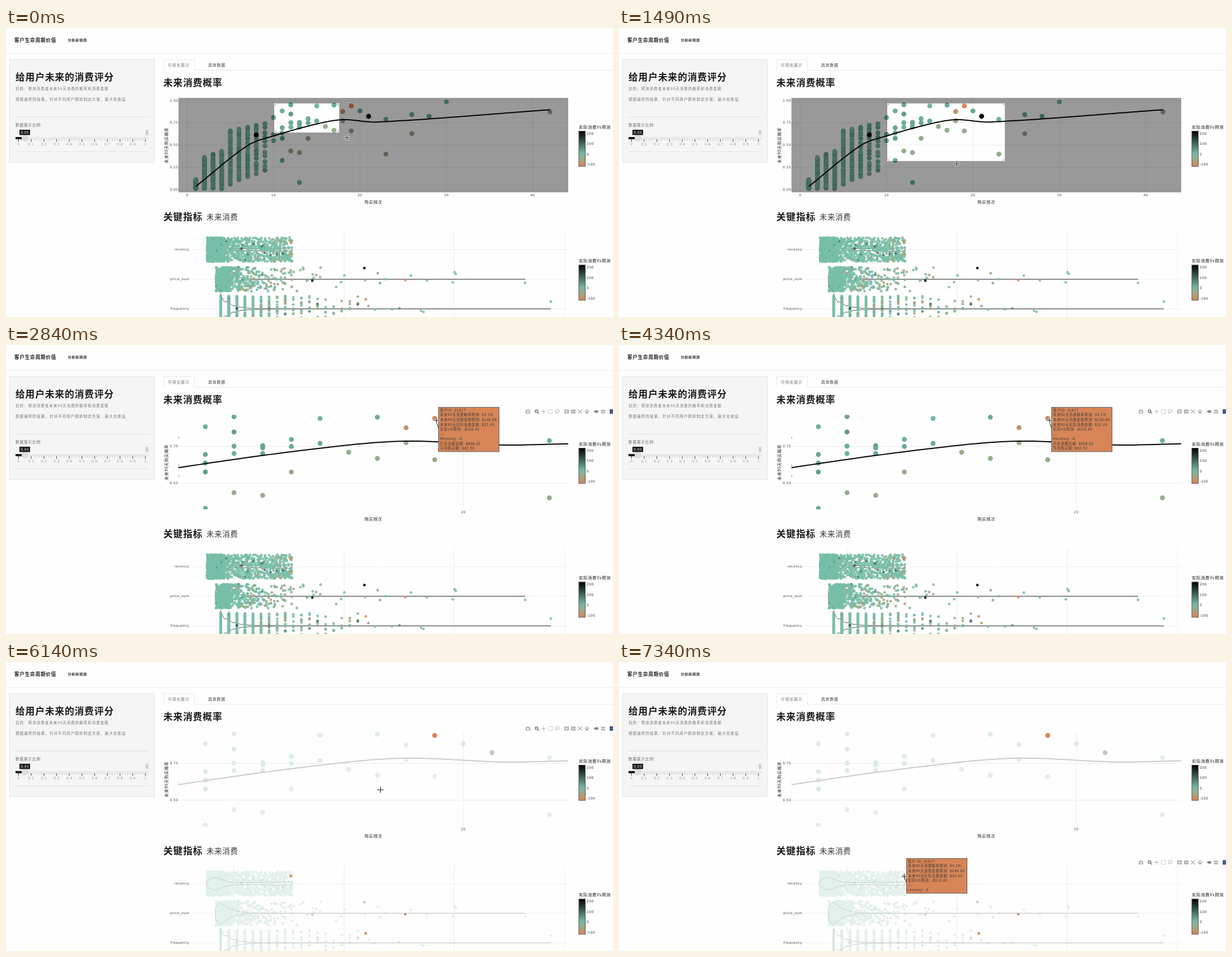
Recreate the animation shown at these times as an HTML page with a canvas. Size 1084x517 px, loop 8 s.

```html
<!DOCTYPE html>
<html lang="zh">
<head>
<meta charset="utf-8">
<style>
html, body { margin: 0; width: 100%; height: 100%; overflow: hidden; background: #fefefe; }
canvas { display: block; }
</style>
</head>
<body>
<canvas id="stage" width="1084" height="517"></canvas>
<script>
const W = 1084, H = 517, LOOP = 8000, STEP = 150;
const CJK = '"Noto Sans CJK SC", "Noto Sans CJK", "Noto Sans", sans-serif';
const AXIS = '"DejaVu Sans", sans-serif';
const TIP = '"Liberation Sans", "Noto Sans CJK SC", "Noto Sans CJK", sans-serif';
let c = document.getElementById('stage').getContext('2d');

let seed = 71;
const rnd = () => (seed = seed * 16807 % 2147483647) / 2147483647;

// Diverging scale: orange below zero, teal at zero, black above; fade mixes to white.
const ORANGE = [215, 133, 86], TEAL = [119, 191, 169], LOWEST = -116, HIGHEST = 220;
function tint(v, fade = 1) {
  const k = Math.min(1, v < 0 ? v / LOWEST : v / HIGHEST), end = v < 0 ? ORANGE : [0, 0, 0];
  return `rgb(${TEAL.map((a, i) => 254 + (a + (end[i] - a) * k - 254) * fade)})`;
}

function text(s, x, y, size, { color = '#222', weight = 400, align = 'left', gap = .9, font = CJK } = {}) {
  c.font = `${weight} ${size}px ${font}`;
  c.letterSpacing = gap + 'px';
  c.textAlign = align;
  c.textBaseline = 'middle';
  c.fillStyle = color;
  c.fillText(s, x, y);
}
const label = (s, x, y, align = 'left', color = '#444') =>
  text(s, x, y, 6, { color, align, gap: .4, font: AXIS });
function rect(x, y, w, h, fill, stroke) {
  if (fill) { c.fillStyle = fill; c.fillRect(x, y, w, h); }
  if (stroke) { c.strokeStyle = stroke; c.lineWidth = 1; c.strokeRect(x, y, w, h); }
}
function line(color, width, ...p) {
  c.strokeStyle = color;
  c.lineWidth = width;
  c.beginPath();
  for (let i = 0; i < p.length; i += 2) c.lineTo(p[i], p[i + 1]);
  c.stroke();
}
function dot(x, y, r, fill) {
  c.fillStyle = fill;
  c.beginPath();
  c.arc(x, y, r, 0, 7);
  c.fill();
}

// ---- probability chart
const knots = [[1, .035], [7, .495], [10, .603], [15, .738], [18, .786], [22, .76], [42, .898]];
const slope = i => {
  const a = knots[Math.max(0, i - 1)], b = knots[Math.min(knots.length - 1, i + 1)];
  return (b[1] - a[1]) / (b[0] - a[0]);
};
// Smooth curve through the knots
function trend(x) {
  const i = Math.max(0, knots.findLastIndex((k, j) => k[0] <= x && j < knots.length - 1));
  const [x0, y0] = knots[i], [x1, y1] = knots[i + 1], d = x1 - x0, u = (x - x0) / d, w = 1 - u;
  return y0 * (1 + 2 * u) * w * w + y1 * (3 - 2 * u) * u * u + d * u * w * (slope(i) * w - slope(i + 1) * u);
}

const points = [];
for (let x = 1; x <= 9; x++) {
  const low = x < 5 ? .01 : .06 + .035 * (x - 5);
  const high = x < 2 ? .11 : x < 5 ? .36 + .035 * (x - 2) : .66 + .02 * (x - 5);
  const n = Math.round(37 - 2.9 * x);
  for (let i = 0; i < n; i++)
    points.push([x, low + (high - low) * Math.min(1, (i + .6 * rnd()) / (n - 1)), rnd() < .12 ? -35 * rnd() : 35 * rnd()]);
}
// Probabilities per frequency; customers under the trend fall short of the forecast.
const columns = {
  10: [.81, .62, .55], 11: [.885, .695, .637, .576, .328], 12: [.954, .849, .752, .702, .435],
  13: [.74, .756, .702, .416, .08], 14: [.798, .75, .576], 15: [.941, .771], 16: [.71], 17: [.95, .668],
  18: [.775], 19: [.66], 20: [.885], 23: [.79, .399], 26: [.843, .629], 28: [.824], 30: [.987], 42: [.874]
};
for (const x in columns)
  for (const p of columns[x]) points.push([+x, p, x > 11 && p > .3 && p < trend(+x) ? -38 : 12 + 30 * rnd()]);
points.push([8, .615, HIGHEST], [21, .824, HIGHEST], [18, .878, -85], [19, .941, LOWEST]);

function topChart(zoomed, faded, corner) {
  const X = v => zoomed ? 51.2 * v - 207.2 : 323.5 + 15.43 * v;
  const Y = v => zoomed ? 378 - 262 * v : 289 - 159 * v;
  const L = 308, R = 1004, T = 125, B = 294;
  for (const v of zoomed ? [.5, .75] : [0, .25, .5, .75, 1]) {
    line('#ebebeb', 1, L, Y(v), R, Y(v));
    label(v.toFixed(2), 307.5, Y(v), 'right');
  }
  for (const v of zoomed ? [20] : [0, 10, 20, 30, 40]) {
    line('#ebebeb', 1, X(v), T, X(v), B);
    label(v, X(v), 299, 'center');
  }
  c.save();
  c.beginPath();
  c.rect(L, T, R - L, B - T);
  c.clip();
  for (const [x, y, v] of points) dot(X(x), Y(y), 4.4, tint(v, faded && v > LOWEST ? .22 : 1));
  const curve = [];
  for (let x = 1; x <= 42; x += .25) curve.push(X(x), Y(trend(x)));
  line(faded ? '#cbcbcb' : '#000', 2, ...curve);
  c.restore();
  if (corner) selection(L, T, R, B, ...corner);

  c.save();
  c.translate(286, 210);
  c.rotate(-Math.PI / 2);
  text('未来90天购买概率', 0, 0, 7.4, { weight: 500, align: 'center', gap: .5 });
  c.restore();
  text('购买频次', 656, 311, 7.4, { weight: 500, align: 'center', gap: .5 });
}

function selection(L, T, R, B, x2, y2) {
  const x1 = 479, y1 = 135;
  c.fillStyle = 'rgba(0,0,0,.4)';
  c.beginPath();
  c.rect(L, T, R - L, B - T);
  c.rect(x1, y1, x2 - x1, y2 - y1);
  c.fill('evenodd');
  for (const [x, sx] of [[x1, 1], [x2, -1]])
    for (const [y, sy] of [[y1, 1], [y2, -1]])
      for (const [color, w] of [['#555', 2.6], ['#fff', 1.4]])
        line(color, w, x + 5 * sx, y, x, y, x, y + 5 * sy);
}

// ---- key metric chart
const ROWS = [396.5, 449.5, 502.5];
const cloud = [];
function scatter(x, row, short, half = 21.5) {
  const q = rnd(), v = q < .03 ? 120 * rnd() : q < .03 + short ? -15 - 45 * rnd() : 6 * rnd() - 3;
  cloud.push([x, ROWS[row] + half * (2 * rnd() - 1), v]);
}
function repeat(n, make) { for (let i = 0; i < n; i++) make(); }
repeat(800, () => scatter(359 + 31 * rnd(), 0, 0));
repeat(520, () => {
  const u = rnd() ** 1.15;
  scatter(388 + 123 * u, 0, .03 + .4 * u ** 3);
});
repeat(520, () => scatter(375 + 24 * rnd(), 1, 0));
repeat(330, () => {
  const d = -36 * Math.log(1 - .997 * rnd());
  scatter(392 + d, 1, Math.min(.6, d / 180));
});
for (let k = 0; k < 18; k++)
  repeat(220 * Math.exp(-k * .37) + 4, () => scatter(383.5 + 14.4 * k, 2, k * .045, 23));
repeat(9, () => scatter(600 + 210 * rnd(), 1, .1, 12));
repeat(6, () => scatter(630 + 180 * rnd(), 2, .4, 6));
cloud.push([640, 429.5, HIGHEST], [547, 452, 190], [801, 437, 0], [927, 456, 0], [973, 489.5, 0],
  [508.5, 383, LOWEST], [713, 451, LOWEST], [642.5, 485.5, LOWEST]);

const bell = (x, mid, left, right, power = 2) => Math.exp(-((Math.abs(x - mid) / (x < mid ? left : right)) ** power));
const violins = [
  [358, 511, x => 2 + Math.max(0, x - 440) / 70 + 9 * bell(x, 373, 14, 18)],
  [374, 927, x => .2 + 19.5 * bell(x, 382, 9, 20, x < 382 ? 2 : 1.2)],
  [383, 973, x => .2 + 27 * Math.exp((383 - x) / 18) * (.85 + .15 * Math.cos((x - 383) * .436))]
];
function violin([from, to, half], y, color) {
  c.strokeStyle = color;
  c.lineWidth = .9;
  c.beginPath();
  for (let x = from; x <= to; x++) c.lineTo(x, y - half(x));
  for (let x = to; x >= from; x--) c.lineTo(x, y + half(x));
  c.closePath();
  c.stroke();
}

function bottomChart(faded) {
  for (let x = 407; x < 1000; x += 196.8) line('#ebebeb', 1, x, 364, x, H);
  ['recency', 'price_sum', 'frequency'].forEach((s, i) => {
    line('#efefef', 1, 331, ROWS[i], 1004, ROWS[i]);
    label(s, 327.5, ROWS[i], 'right');
  });
  const outlines = () => violins.forEach((v, i) => violin(v, ROWS[i], faded ? '#c6cbc9' : '#4a4a4a'));
  if (!faded) outlines();
  c.globalAlpha = faded ? 1 : .88;
  for (const [x, y, v] of cloud) dot(x, y, 2.4, tint(v, faded && v > LOWEST ? .2 : 1));
  c.globalAlpha = 1;
  if (faded) outlines();
}

// ---- fixed page parts
function legend(y) {
  text('实际消费Vs预测', 1023, y, 7.4, { weight: 500, gap: .65, color: '#111' });
  const g = c.createLinearGradient(0, y + 7.5, 0, y + 70.5);
  for (let i = 0; i <= 8; i++) g.addColorStop(i / 8, tint(HIGHEST - 42 * i));
  rect(1023, y + 7.5, 11.5, 63, g, '#555');
  ['200', '100', '0', '-100'].forEach((s, i) => label(s, 1037, y + 12.2 + 18.5 * i, 'left', '#333'));
}

function sidebar() {
  rect(6.5, 56.5, 258.5, 184, '#f5f5f5', '#e2e2e2');
  text('给用户未来的消费评分', 17, 88, 16.7, { weight: 700, color: '#1a1a1a' });
  const soft = { color: '#777', weight: 300 };
  text('目的：预测消费者未来90天消费的概率和消费金额', 17, 108, 6.6, soft);
  text('根据最终的结果，针对不同用户群体制定方案，最大化收益', 17, 127, 6.7, soft);
  text('数据展示比例:', 17, 173.5, 6.6, { color: '#666' });
  line('#e0e0e0', 1, 17, 159.5, 254, 159.5);
  line('#e0e0e0', 1, 17, 221.5, 254, 221.5);
  rect(17, 195, 238, 4, '#e9e9e9');
  rect(17, 195, 12, 4, '#1a1a1a');
  for (let i = 0; i <= 50; i++) {
    const x = 22.3 + 4.534 * i, major = i % 5 == 0;
    line(major ? '#333' : '#aaa', major ? 1 : .7, x, 199, x, major ? 203.5 : 201.5);
    if (major) label(i / 50, x, 208.5, 'center', '#999');
  }
  dot(33.5, 197, 5.6, '#c8c8c8');
  dot(33.5, 197, 5, '#dedede');
  rect(24, 182, 19, 9.5, '#1a1a1a');
  label('0.05', 33.7, 187, 'center', '#fff');
  rect(249, 182, 5.5, 10, '#dcdcdc');
  label('1', 252, 187, 'center', '#999');
}

function page() {
  rect(0, 0, W, H, '#fefefe');
  text('客户生命周期价值', 15, 22, 8.6, { weight: 700, gap: .75 });
  text('分析和预测', 110.5, 22, 6.1, { weight: 700, gap: .7 });
  line('#eee', 1, 0, 45.5, W, 45.5);
  sidebar();
  line('#eaeaea', 1, 281.5, 75.5, 281.5, 56.5, 336.5, 56.5, 336.5, 75.5, W, 75.5);
  text('可视化展示', 289, 66, 6.9, { color: '#777' });
  text('具体数据', 361, 66, 6.9, { color: '#333' });
  const bold = { weight: 700, color: '#1a1a1a' };
  text('未来消费概率', 281, 97.5, 16.7, bold);
  text('关键指标', 281, 337.5, 16.7, bold);
  text('未来消费', 358, 338, 13.3, { color: '#333' });
  legend(177);
  legend(416.5);
}

function modebar(y) {
  const g = '#b0b0b0', dark = '#858585', paper = '#fefefe';
  const plus = (x, y, r, color, w = 1) => {
    line(color, w, x - r, y, x + r, y);
    line(color, w, x, y - r, x, y + r);
  };
  c.save();
  c.translate(0, y);
  rect(928, -2.5, 8, 6, g);
  rect(930.5, -3.5, 3, 1.5, g);
  dot(932, .5, 1.8, paper);
  dot(947.5, -.5, 3.3, dark);
  plus(947.5, -.5, 2, paper);
  line(dark, 1.6, 949.5, 1.5, 952, 4);
  plus(960, 0, 4, g);
  c.setLineDash([1.5, 1]);
  rect(968.5, -3.5, 7, 7, null, g);
  c.setLineDash([]);
  c.beginPath();
  c.ellipse(984.5, -1, 3.6, 2.5, 0, 0, 7);
  c.stroke();
  line(g, 1, 982.5, 1, 982, 4);
  for (const x of [1001, 1013]) rect(x - 4, -3.5, 8, 7, g);
  plus(1001, 0, 2.3, paper, 1.2);
  line(paper, 1.2, 1010.7, 0, 1015.3, 0);
  line(g, 1.2, 1021.5, -3.5, 1028.5, 3.5);
  line(g, 1.2, 1021.5, 3.5, 1028.5, -3.5);
  line(g, 1.2, 1033.5, 0, 1037.5, -3, 1041.5, 0);
  rect(1035, 0, 5, 3.5, g);
  line(dark, 4.5, 1051.5, 0, 1057.5, 0);
  line(dark, 1.5, 1049.8, 0, 1052, 0);
  rect(1062.5, -3, 7.5, 2.6, g);
  rect(1062.5, .8, 7.5, 2.6, g);
  rect(1078, -4, 8, 8, '#46598f');
  c.restore();
}

function tooltip(x, y, v, lines, px, py) {
  line('#444', 1.2, px, py, x, py + 12);
  rect(x, y, 108, 2.4 + 8.55 * lines.length, tint(v), '#5c5c5c');
  lines.forEach((s, i) => text(s, x + 2.5, y + 5.6 + 8.55 * i, 6.4, { color: '#3c3c3c', gap: .5, font: TIP }));
}
const facts = (id, chance, guess, real, diff) => [id, `未来90天消费概率预测: ${chance}%`,
  `未来90天消费金额预测: $${guess}`, `未来90天实际消费金额: $${real}`, `实际VS预测: -$${diff}`, '---'];
const chosen = ['94.1', '148.89', '32.49', '116.40'];
const tips = {
  big: [772.5, 111.5, LOWEST, [...facts('客户ID: 01817', ...chosen),
    'Recency: -6', '历史消费总额: $808.02', '平均购买额: $42.53'], 768.5, 137],
  green: [514.5, 351, -21.72, [...facts('客户 ID: 00244', '95.1', '123.28', '101.56', '21.72'),
    'recency: -3'], 511.5, 372],
  small: [513.5, 351.5, LOWEST, [...facts('客户 ID: 01817', ...chosen), 'recency: -6'], 510, 383]
};

function cursor(x, y) {
  for (const [color, w, r] of [['rgba(255,255,255,.9)', 2.8, 6], ['#111', 1, 5.5]]) {
    line(color, w, x - r, y, x + r, y);
    line(color, w, x, y - r, x, y + r);
  }
}

// ---- timeline: [first step, last step, x, y]
const moves = [[0, 0, 609, 196], [150, 600, 689, 238], [1340, 1490, 603, 243],
  [2090, 2840, 769, 135], [5840, 6740, 514, 373], [6890, 7340, 510, 384]];
const ease = u => u * u * (3 - 2 * u);
function pointer(t) {
  let x = 595, y = 187;
  for (const [from, to, tx, ty] of moves) {
    if (t < from) break;
    const steps = (to - from) / STEP + 1;
    const u = ease(Math.min(1, (Math.floor((t - from) / STEP) + 1) / steps));
    x += (tx - x) * u;
    y += (ty - y) * u;
  }
  return [x, y];
}

function layer(draw) {
  const canvas = document.createElement('canvas'), main = c;
  canvas.width = W;
  canvas.height = H;
  c = canvas.getContext('2d');
  draw();
  c = main;
  return canvas;
}
const [plain, pale] = [false, true].map(faded => layer(() => { page(); bottomChart(faded); }));

function frame() {
  const t = performance.now() % LOOP, [x, y] = pointer(t);
  const zoomed = t >= 1640, faded = t >= 5390;
  c.drawImage(faded ? pale : plain, 0, 0);
  // the box trails the pointer by one step until release
  topChart(zoomed, faded, zoomed ? null : pointer(Math.min(t, 1300) - STEP));
  if (zoomed) modebar(y < 320 ? 119 : 358.5);
  const tip = t >= 7340 ? 'small' : t >= 6740 ? 'green' : t >= 2840 && t < 5840 ? 'big' : '';
  if (tip) tooltip(...tips[tip]);
  cursor(x, y);
  requestAnimationFrame(frame);
}
frame();
</script>
</body>
</html>
```
